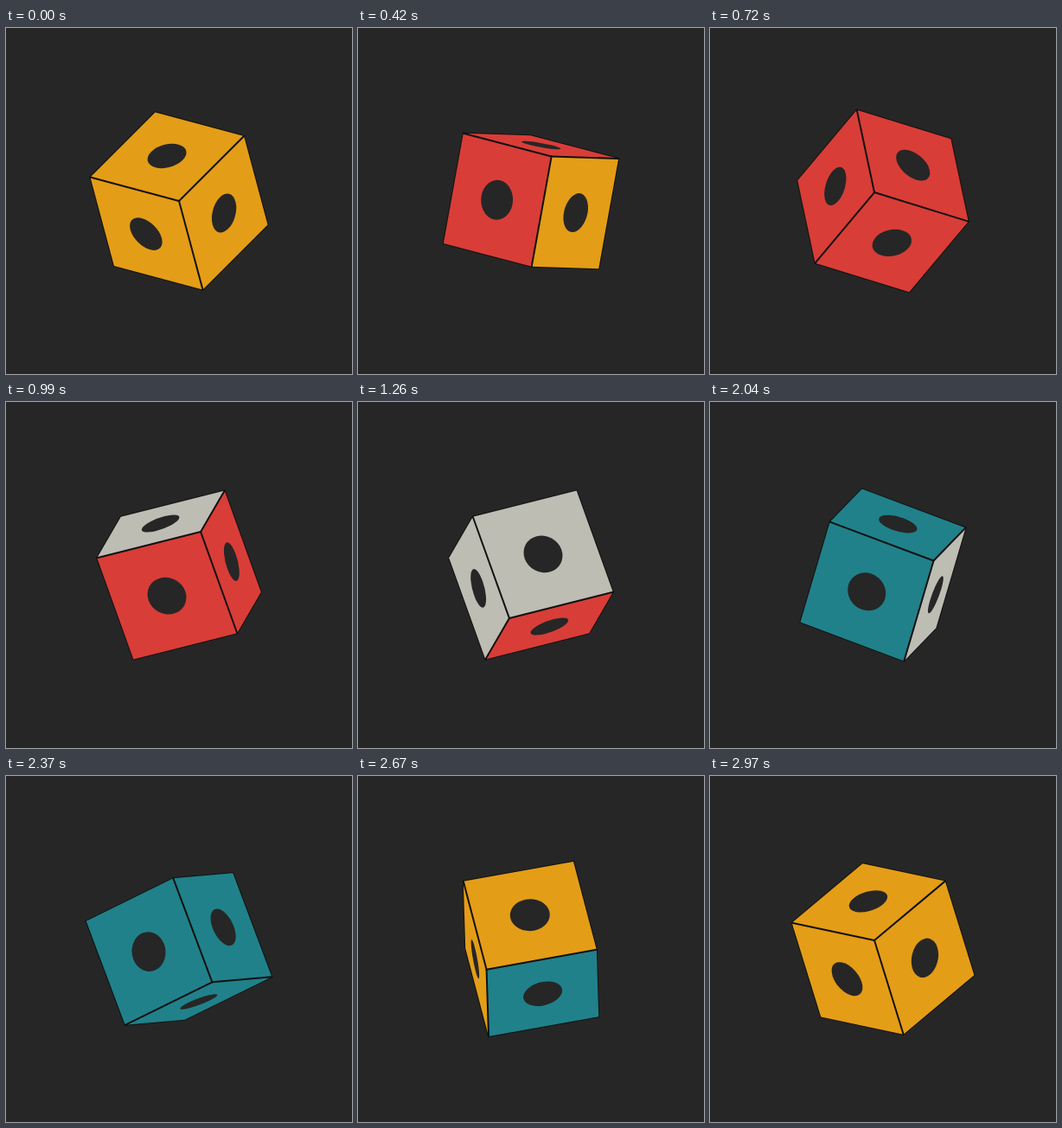
An HTML page with a canvas for the animation above (3 s loop, 400x400 px).

```html
<!DOCTYPE html>
<html lang="en">
<head>
<meta charset="utf-8">
<title>Tumbling cube</title>
<style>
  html, body { margin: 0; width: 100%; height: 100%; overflow: hidden; background: #262626; }
  canvas { display: block; }
</style>
</head>
<body>
<canvas id="stage" width="400" height="400"></canvas>
<script>
const ctx = document.getElementById('stage').getContext('2d');
const COLORS = ['#e49d17', '#d93d37', '#bebdb3', '#20818a'];
const BACK = '#262626', LINE = '#111';
const LOOP = 3000, TICK = 30, HALF_TURN = 750;
const HALF = 65, DOT = 23, DOT_LIFT = 66;

// Cube axes seen along the body diagonal: x right, y down, z toward the viewer.
const AXES = [195, -45, 75].map(deg => {
  const a = deg * Math.PI / 180, r = Math.sqrt(2 / 3);
  return [r * Math.cos(a), r * Math.sin(a), -1 / Math.sqrt(3)];
});

// Rotation about the in-plane diagonal (-1, 1, 0).
function spin([x, y, z], angle) {
  const c = Math.cos(angle), s = Math.sin(angle) * Math.SQRT1_2;
  const along = (y - x) / 2 * (1 - c);
  return [x * c + z * s - along, y * c + z * s + along, z * c - (x + y) * s];
}

// Path through points given as multiples of the three normals n.
function trace(n, points) {
  const path = new Path2D();
  for (const w of points) {
    const at = k => HALF * (n[0][k] * w[0] + n[1][k] * w[1] + n[2][k] * w[2]);
    path.lineTo(at(0), at(1));
  }
  return path;
}

function drawDot(n, p, q) {
  ctx.save();
  ctx.transform(p[0], p[1], q[0], q[1], n[0] * DOT_LIFT, n[1] * DOT_LIFT);
  ctx.beginPath();
  ctx.arc(0, 0, DOT, 0, 2 * Math.PI);
  ctx.fill();
  ctx.restore();
}

function draw(time) {
  const phase = Math.floor(time / HALF_TURN);
  const leaving = phase % 2 ? 1 : -1;

  // The three sides turned to the viewer; a side takes the next colour while out of sight.
  const colors = [];
  const normals = AXES.map(axis => {
    const v = spin(axis, Math.PI * time / HALF_TURN);
    const side = v[2] > 0 ? 1 : -1;
    colors.push(COLORS[(phase + (side === leaving ? 0 : 1)) % COLORS.length]);
    return v.map(k => k * side);
  });
  const turned = i => [normals[i], normals[(i + 1) % 3], normals[(i + 2) % 3]];
  const faces = [0, 1, 2].map(i =>
    trace(turned(i), [[1, 1, 1], [1, -1, 1], [1, -1, -1], [1, 1, -1], [1, 1, 1]]));

  ctx.setTransform(1, 0, 0, 1, 0, 0);
  ctx.fillStyle = BACK;
  ctx.fillRect(0, 0, 400, 400);
  ctx.translate(200, 200);
  ctx.strokeStyle = LINE;
  ctx.lineWidth = 2;
  ctx.lineJoin = ctx.lineCap = 'round';

  // Fills cover the inner half of the outline; the front ribs lie on top.
  faces.forEach(face => ctx.stroke(face));
  faces.forEach((face, i) => {
    ctx.fillStyle = colors[i];
    ctx.fill(face);
  });
  ctx.fillStyle = BACK;
  for (let i = 0; i < 3; i++) {
    ctx.stroke(trace(turned(i), [[1, 1, 1], [-1, 1, 1]]));
    drawDot(...turned(i));
  }
}

function frame() {
  const time = performance.now() % LOOP;
  draw(Math.floor(time / TICK) * TICK);
  requestAnimationFrame(frame);
}
frame();
</script>
</body>
</html>
```
